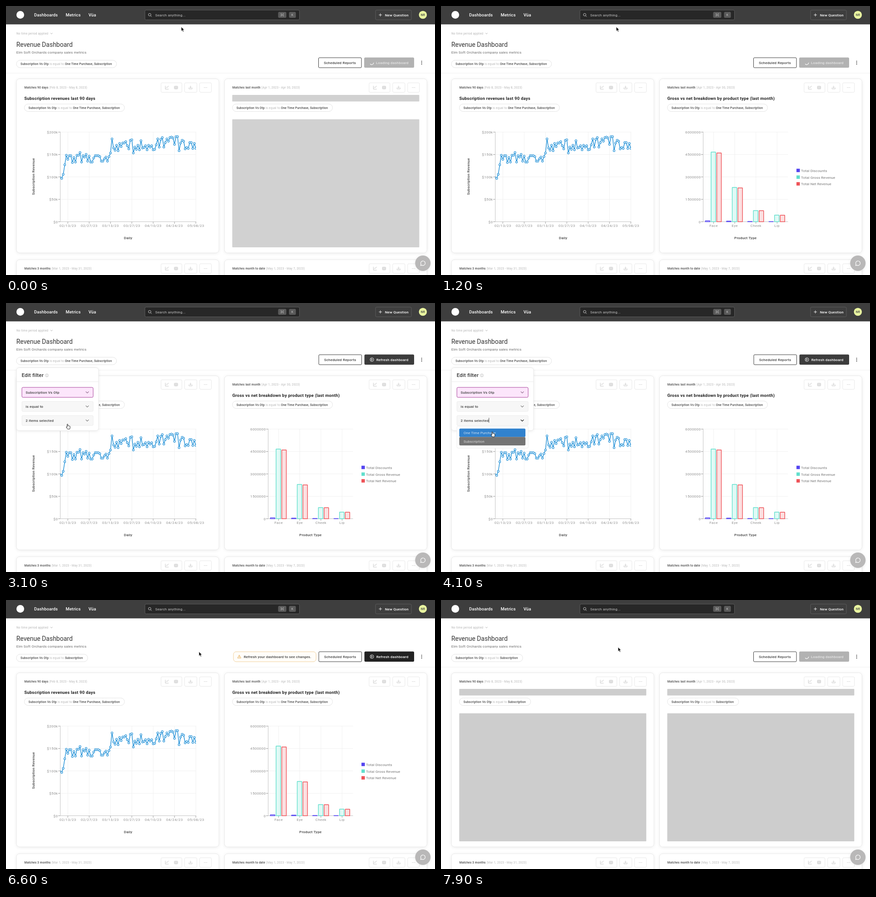
Recreate the animation shown at these times as an HTML page. Size 945x593 px, loop 8 s.

```html
<!DOCTYPE html>
<html lang="en">
<head>
<meta charset="utf-8">
<title>Revenue Dashboard</title>
<style>
html, body { margin: 0; height: 100%; overflow: hidden; background: #fff; }
svg { display: block; width: 100vw; height: 100vh; }
text { font: 8px Roboto, "Open Sans", sans-serif; letter-spacing: .17px; fill: #444; white-space: pre; }
.m { font-weight: 500; }
.nav { font-size: 9.5px; font-weight: 500; letter-spacing: .1px; fill: #fff; }
.h1 { font-size: 14px; letter-spacing: 0; fill: #333; }
.h2 { font-size: 9.5px; font-weight: 600; letter-spacing: .22px; fill: #222; }
.h3 { font-size: 11.5px; font-weight: 500; fill: #333; }
.s { font-size: 6.5px; letter-spacing: .22px; }
.ax { letter-spacing: .4px; fill: #909090; }
.dim { fill: #b4b4b4; font-weight: 400; }
.w { fill: #fff; }
.line { fill: none; stroke-linecap: round; stroke-linejoin: round; }
</style>
</head>
<body>
<svg id="stage" viewBox="0 0 945 593" preserveAspectRatio="none"></svg>
<script>
const LOOP = 8000, CHART = 1100, READY = 1400, POPUP = 2700, LIST = 3400,
      PICK = 4300, LIST_END = 4800, POPUP_END = 5000, RELOAD = 6700;

const text = (x, y, s, cls = '', anchor = 'start') =>
  `<text x="${x}" y="${y}" class="${cls}" text-anchor="${anchor}">${s}</text>`;
const rect = (x, y, w, h, r = 0, fill = 'none', stroke = 'none', extra = '') =>
  `<rect x="${x}" y="${y}" width="${w}" height="${h}" rx="${r}" fill="${fill}" stroke="${stroke}" ${extra}/>`;
const path = (d, stroke, width = 1, extra = '') =>
  `<path class="line" d="${d}" stroke="${stroke}" stroke-width="${width}" ${extra}/>`;
const circle = (x, y, r, fill, stroke = 'none', extra = '') =>
  `<circle cx="${x}" cy="${y}" r="${r}" fill="${fill}" stroke="${stroke}" ${extra}/>`;
const during = (spans, body) => `<g data-on="${spans}">${body}</g>`;
const chevron = (x, y, r, color, width) => path(`M${x - r} ${y - r / 2}l${r} ${r} ${r} ${-r}`, color, width);

const BUSY = `0-${READY},${RELOAD}-${LOOP}`, IDLE = `${READY}-${RELOAD}`;

function pill(x, y, single) {
  const value = single ? 'Subscription' : 'One Time Purchase, Subscription';
  return rect(x, y, single ? 157 : 220.5, 16.5, 8.2, '#fff', '#e4e4e4') +
    text(x + 9, y + 10.8, `Subscription Vs Otp<tspan class="dim"> is equal to </tspan>${value}`, 's m');
}
const pills = (x, y, change) =>
  during(`0-${change}`, pill(x, y, false)) + during(`${change}-${LOOP}`, pill(x, y, true));

function tools(x, y) {
  const c = '#c6c6c6';
  const box = (dx, w) => rect(x + dx, y, w, 21, 2.5, '#fff', '#e8e8e8');
  const cy = y + 10.5;
  return box(0, 46) + box(52, 27) + box(85, 26) +
    path(`M${x + 9.5} ${cy - 3.5}v7h7m-5.5 -2.5l2 -2.5 1.5 1 2 -3`, c, .9) +
    rect(x + 29.5, cy - 3, 7, 6, .5, 'none', c) +
    path(`M${x + 29.5} ${cy - 1}h7m-7 2h7M${x + 33} ${cy - 2}v5`, c, .8) +
    path(`M${x + 65} ${cy - 3.5}v4.5m-2 -2l2 2 2 -2m-5.5 1.5v2.5h7v-2.5`, c, .9) +
    [-2.7, 0, 2.7].map(d => circle(x + 98 + d, cy, .75, c)).join('');
}

function card(x, y, name, range) {
  return rect(x, y, 446, 384, 7, '#fff', '#e7e7e7', 'filter="url(#soft)"') +
    text(x + 17.5, y + 21.8, `${name} <tspan class="dim">${range}</tspan>`, 's m') +
    tools(x + 318.5, y + 9);
}
const bones = x => `<g class="bone">${rect(x, 196, 412, 14.5, 1)}${rect(x, 249.7, 412, 282.3, 1)}</g>`;

// Shared frame of both charts: rows are evenly spaced from 278 down to 475.5.
function axes(x0, x1, rows, columns) {
  let s = '';
  rows.forEach((label, i) => {
    const y = 278 + i * 49.4;
    s += path(`M${x0} ${y}H${x1}`, '#eeeeee', .8) + path(`M${x0 - 4} ${y}h4`, '#999', 1) +
      text(x0 - 5.2, y + 3, label, 'ax', 'end');
  });
  columns.forEach(([x, label]) => {
    s += path(`M${x} 278V475`, '#eeeeee', .8) + path(`M${x} 475.5v4`, '#999', 1) +
      text(x, 487, label, 'ax', 'middle');
  });
  return s + path(`M${x0} 278V475.5H${x1}`, '#c4c4c4', 1);
}

function lineChart() {
  const ys = [376,380,371,350,329,338,330,330,345,334,344,329,329,323,344,330,333,327,342,331,
    344,344,335,330,330,330,332,342,342,337,333,342,332,324,293,313,318,307,319,303,
    310,302,302,299,308,315,296,295,324,311,316,307,317,297,313,312,308,317,307,311,
    308,317,316,306,293,311,294,290,311,301,293,298,290,289,291,305,288,288,319,302,
    296,298,315,312,314,301,301,314,303,314];
  const pts = ys.map((y, i) => [119.4 + i * 3.357, y]);
  const dates = ['02/13/23', '02/27/23', '03/13/23', '03/27/23', '04/10/23', '04/24/23', '05/08/23'];
  return axes(119.5, 418, ['$200k', '$150k', '$100k', '$50k', '$0'], dates.map((d, i) => [136.2 + i * 47, d])) +
    `<g clip-path="url(#plot)">` + path('M' + pts.join('L'), '#2693d8', 1.5) +
    pts.slice(1).map(([x, y]) => circle(x, y, 2.05, '#fff', '#2693d8', 'stroke-width="1.2"')).join('') + '</g>' +
    text(269, 513.5, 'Daily', 'm', 'middle') +
    `<g transform="translate(62.5 376) rotate(-90)">${text(0, 0, 'Subscription Revenue', 'm', 'middle')}</g>`;
}

function barChart() {
  const tints = [['#5546f0', '#d9d5ff'], ['#62dfcd', '#e0faf6'], ['#ee5358', '#fce0e1']];
  const groups = [['Face', 473.4, 322, 324], ['Eye', 474.3, 400, 401], ['Cheek', 475, 451, 451.3], ['Lip', 475.1, 461, 461.3]];
  let s = axes(577.5, 764, ['6000000', '4500000', '3000000', '1500000', '0'],
    groups.map((g, i) => [600.5 + i * 46.6, g[0]]));
  groups.forEach(([, ...tops], i) => tops.forEach((top, k) => {
    const x = 582.3 + i * 46.6 + k * 12.6, [edge, fill] = tints[k];
    s += `<path d="M${x} 475.5V${top + .5}q0 -.5 .5 -.5h9q.5 0 .5 .5V475.5z" fill="${fill}" stroke="${edge}" stroke-width="1.4"/>`;
  }));
  ['Total Discounts', 'Total Gross Revenue', 'Total Net Revenue'].forEach((label, k) => {
    const y = 362.7 + k * 14.8;
    s += rect(783, y - 4, 7.5, 7.5, 0, tints[k][0]) + text(793, y + 3, label, 'ax" style="letter-spacing:.13px;fill:#777');
  });
  return s + text(670.7, 513.5, 'Product Type', 'm', 'middle');
}

function topBar() {
  return rect(0, 0, 945, 40.5, 0, '#3e3e3e') + circle(31.5, 19.5, 8.5, '#fff') +
    text(62, 23, 'Dashboards', 'nav') + text(131.5, 23, 'Metrics', 'nav') + text(181.7, 23, 'Vüa', 'nav') +
    rect(306, 9, 340.5, 21.5, 2.5, '#272727', '#5c5c5c') +
    circle(316.5, 19.2, 2.8, 'none', '#ccc') + path('M318.6 21.4l2 2', '#ccc', 1) +
    text(328.7, 22.6, 'Search anything...', '" style="fill:#c4c4c4;letter-spacing:.2px') +
    rect(599.5, 13, 18, 13, 2.5, '#5a5a5a') + rect(623.5, 13, 15, 13, 2.5, '#5a5a5a') +
    path('M606.9 18.2h3.2v2.6h-3.2zM606.9 18.2h-.7a.9 .9 0 1 1 .7 -.7zM610.1 18.2h.7a.9 .9 0 1 0 -.7 -.7zM606.9 20.8h-.7a.9 .9 0 1 0 .7 .7zM610.1 20.8h.7a.9 .9 0 1 1 -.7 .7z', '#bbb', .6) +
    text(631, 21.8, 'K', 's" style="fill:#ccc', 'middle') +
    rect(814, 9, 79, 21.5, 2.5, 'none', '#5c5c5c') + path('M821.7 19.7h6m-3 -3v6', '#fff', .9) +
    text(834.7, 22.7, 'New Question', 'm w') +
    circle(918.3, 19.5, 8.8, '#e9f5a0') + text(918.4, 21.7, 'NR', 's m', 'middle');
}

function heading() {
  return text(23, 62.8, 'No time period applied', 's dim') + chevron(100.3, 60.7, 1.9, '#aaa', 1) +
    text(22.7, 90.2, 'Revenue Dashboard', 'h1') +
    text(22.8, 104.6, 'Elm Soft Orchards company sales metrics', '" style="fill:#6c6c6c;letter-spacing:.14px') +
    pills(23, 119.5, PICK) + path('M0 148H945', '#efefef', 1) +
    [121.7, 125, 128.3].map(y => circle(915.6, y, .95, '#333')).join('') +
    during(BUSY, rect(688.5, 114, 94.5, 22, 2, '#fff', '#3a3a3a') + text(700.2, 127.9, 'Scheduled Reports', 'm') +
      rect(789, 113.5, 110, 22.5, 2.5, '#b2b2b2') +
      `<path id="spin" class="line" d="M809.8 125.2a4.3 4.3 0 0 1 -7.3 2.8" stroke="#fff" stroke-width="1.2"/>` +
      text(815, 127.9, 'Loading dashboard', 'm" style="fill:#e4e4e4')) +
    during(IDLE, rect(689, 114, 94.5, 22, 2, '#fff', '#3a3a3a') + text(700.7, 127.9, 'Scheduled Reports', 'm') +
      rect(789.5, 113.5, 109.5, 22.5, 2.5, '', 'none', 'id="refresh"') +
      circle(806, 124.8, 4, 'none', '#fff', 'stroke-width=".9"') +
      path('M805 123l2.8 1.8 -2.8 1.8z', '#fff', .8) + text(815.7, 127.9, 'Refresh dashboard', 'm w')) +
    during(`${PICK}-${RELOAD}`, rect(501, 114, 182, 22, 6, '#fffdf9', '#f2d09a') +
      path('M514 121.6l3.6 6.4h-7.2zM514 124v1.6m0 1v.2', '#e5aa4f', .9) +
      text(523.7, 127.9, 'Refresh your dashboard to see changes.', 'm" style="letter-spacing:.13px'));
}

function popup() {
  const field = (y, label, fill, edge, arrow) =>
    rect(35, y, 157, 22, 2.5, fill, edge) + text(43.3, y + 13.8, label, 'm') + chevron(179, y + 11, 3, arrow, 1.1);
  const third = (label, arrow) => field(248, label, '#f7f7f7', '#ececec', arrow);
  const caret = path('M105.6 253.5v10', '#333', .8);
  return during(`${POPUP}-${POPUP_END}`,
    rect(23, 142.5, 181, 139, 6, '#fff', '#e6e6e6', 'filter="url(#soft)"') +
    text(34.5, 163.3, 'Edit filter', 'h3') + circle(90, 159.6, 3.3, 'none', '#aaa', 'stroke-width=".7"') +
    path('M90 159.4v1.8m0 -3.3v.1', '#aaa', .8) + path('M23 173.5h181', '#ededed', 1) +
    field(186, 'Subscription Vs Otp', '#fce6fb', '#a8429b', '#9b7898') +
    field(217, 'is equal to', '#f7f7f7', '#ececec', '#888') +
    during(`${POPUP}-${LIST}`, third('2 items selected', '#888')) +
    during(`${LIST}-${PICK}`, third('2 items selected', '#222') + caret) +
    during(`${PICK}-${LIST_END}`, third('1 items selected', '#222') + caret) +
    during(`${LIST_END}-${POPUP_END}`, third('1 items selected', '#888')) +
    during(`${LIST}-${LIST_END}`, rect(35, 271.5, 157, 48.5, 3, '#fff', '#ececec') +
      rect(40.3, 276.7, 145.7, 18.6, 2.5, '#3182ce') + rect(40.3, 295.3, 145.7, 18.6, 2.5, '#747474') +
      text(49.8, 289, 'One Time Purchase', '" style="fill:#cfe0f1;letter-spacing:.1px') +
      text(49.8, 307.5, 'Subscription', '" style="fill:#dadada;letter-spacing:.1px')));
}

const stage = document.getElementById('stage');
stage.innerHTML = `<defs>
  <filter id="soft" x="-10%" y="-10%" width="120%" height="120%"><feDropShadow dx="0" dy="1" stdDeviation="3" flood-opacity=".07"/></filter>
  <clipPath id="plot"><rect x="119.5" y="270" width="299" height="208"/></clipPath></defs>` +
  rect(0, 0, 945, 593, 0, '#fff') + topBar() + heading() +
  card(23, 160.3, 'Matches 90 days', '(Feb 8, 2023 - May 8, 2023)') +
  card(481.3, 160.3, 'Matches last month', '(Apr 1, 2023 - Apr 30, 2023)') +
  card(23, 559.2, 'Matches 3 months', '(Mar 1, 2023 - May 31, 2023)') +
  card(481.3, 559.2, 'Matches month to date', '(May 1, 2023 - May 7, 2023)') +
  pills(40.5, 216, RELOAD) + pills(498.8, 216, RELOAD) +
  during(`0-${RELOAD}`, text(40.2, 206.6, 'Subscription revenues last 90 days', 'h2') + lineChart()) +
  during(`${CHART}-${RELOAD}`, text(498.6, 206.6, 'Gross vs net breakdown by product type (last month)', 'h2') + barChart()) +
  during(`${RELOAD}-${LOOP}`, bones(40.2)) + during(`0-${CHART},${RELOAD}-${LOOP}`, bones(498.4)) +
  popup() +
  circle(918.3, 567, 17, '#b9b8b8', 'none', 'filter="url(#soft)"') +
  path('M913.2 572.2l.9 -2.8a5 5 0 1 1 2 2z', '#fff', 1.2) +
  `<g id="cursor">` +
  during('0-2400,4500-5200,6500-8000',
    `<path d="M0 0v9.4l2.2 -2 1.6 3.6 1.7 -.8 -1.6 -3.4h3z" fill="#111" stroke="#fff" stroke-width=".7"/>`) +
  during('2400-4500,5200-6500',
    `<path d="M-.9 .9q.9 -1.2 1.7 0v3.3q1 -.7 1.7 .2 1 -.6 1.6 .4 1.2 -.4 1.5 .7v3q0 1.3 -.9 3h-4.6l-2.8 -4.1q-.1 -1.2 1.1 -.8l.7 .8z" fill="#fff" stroke="#111" stroke-width=".9" stroke-linejoin="round"/>`) +
  '</g>';

const stops = [[0, 386, 46], [1700, 386, 46], [2500, 175, 126], [2800, 175, 126], [3100, 135.5, 266.5],
  [3500, 135.5, 266.5], [3700, 113, 283.5], [4400, 113, 283.5], [4700, 262, 152], [4950, 262, 152],
  [5400, 798.5, 114.5], [5800, 842, 124], [6100, 842, 124], [6300, 838, 128], [6400, 838, 128],
  [6600, 425, 114], [7300, 396, 106], [7900, 390, 104], [LOOP, 390, 104]];

function cursorAt(t) {
  const i = stops.findIndex(s => s[0] > t);
  const [a, b] = [stops[i - 1], stops[i]];
  const u = (t - a[0]) / (b[0] - a[0]), k = u * u * (3 - 2 * u);
  return [a[1] + (b[1] - a[1]) * k, a[2] + (b[2] - a[2]) * k];
}

const clamp = v => Math.min(1, Math.max(0, v));
const grey = v => `rgb(${v},${v},${v})`;
const timed = [...stage.querySelectorAll('[data-on]')].map(el =>
  [el, el.dataset.on.split(',').map(s => s.split('-').map(Number))]);
const boneGroups = stage.querySelectorAll('.bone rect');
const [cursor, spin, refresh] = ['cursor', 'spin', 'refresh'].map(id => document.getElementById(id));

function draw(now) {
  const t = now % LOOP;
  for (const [el, spans] of timed)
    el.style.display = spans.some(([a, b]) => t >= a && t < b) ? '' : 'none';
  cursor.setAttribute('transform', `translate(${cursorAt(t)})`);
  const turn = (t < RELOAD ? t : t - RELOAD) % 400 / 400 * 360;
  spin.setAttribute('transform', `rotate(${turn} 805.6 124.9)`);
  refresh.style.fill = grey(Math.round(60 - 26 * clamp((t - 5400) / 200)));
  const bone = grey(Math.round(209 - 4 * clamp((t - RELOAD) / 600)));
  boneGroups.forEach(b => b.style.fill = bone);
  requestAnimationFrame(draw);
}
draw(performance.now());
</script>
</body>
</html>
```
